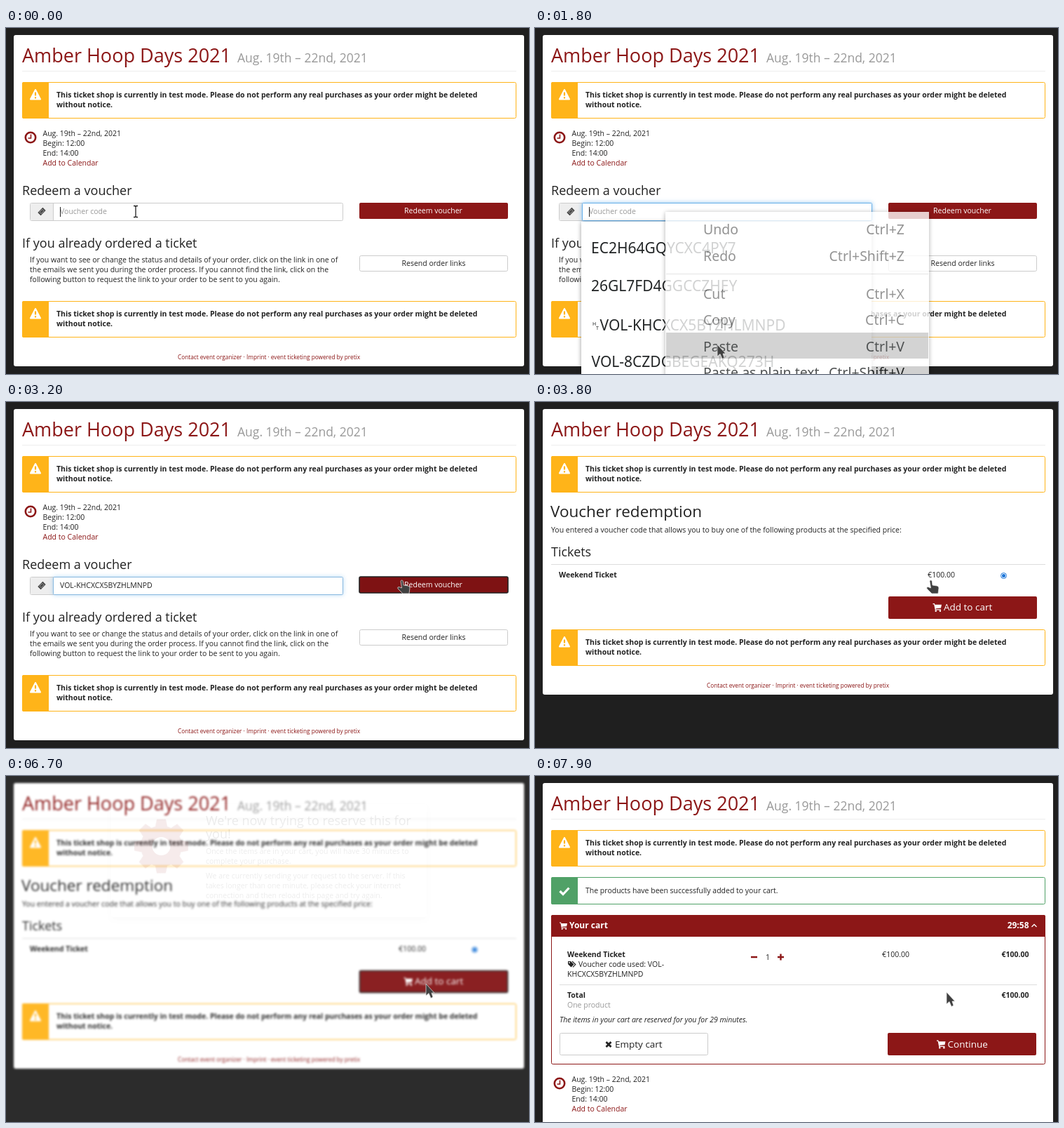
Write an HTML page that moves like this. It is 746 by 493 pixels and loops after 8000 ms.

```html
<!DOCTYPE html>
<html lang="en">
<head>
<meta charset="utf-8">
<title>Ticket shop</title>
<style>
  html, body { margin: 0; width: 100%; height: 100%; overflow: hidden; background: #1f1f1f; }
  svg { display: block; width: 746px; height: 493px; }
  text { font: 10.5px 'Open Sans', sans-serif; fill: #222; white-space: pre; }
  .b { font-weight: 700; }
  .i { font-style: italic; }
  .red { fill: #8c1717; }
  .white { fill: #fff; }
  .grey { fill: #999; }
  .mid { text-anchor: middle; }
  .end { text-anchor: end; }
  .h1 { font-size: 27px; }
  .date { font-size: 17.5px; }
  .h2 { font-size: 22.5px; }
  .h3 { font-size: 18px; }
  .lg { font-size: 13.5px; }
  .head { font-size: 12px; }
  .foot { font-size: 8.25px; }
  .sys { font-family: 'Noto Sans', sans-serif; font-size: 21px; fill: #232627; }
  .menu text { font-family: 'Noto Sans', sans-serif; font-size: 19.5px; fill: #232627; }
  .menu .off { fill: #777; }
  .plain { font: 10px 'Liberation Sans', Arial, sans-serif; fill: #000; }
  .box { fill: #fff; stroke: #ccc; }
  .ring { fill: none; stroke: #222; stroke-width: 1.6; }
  .pop { fill: #fff; filter: drop-shadow(0 1px 3px rgba(0,0,0,.4)); }
  .sheet { fill: #fff; filter: drop-shadow(0 4px 5px rgba(0,0,0,.2)); }
  .glow { fill: #fff; stroke: #66afe9; filter: drop-shadow(0 0 3px rgba(102,175,233,.7)); }

  /* One loop is 8 s, so 1.25% is a tenth of a second. */
  .cut { animation: 8s step-end infinite; }
  .flow { animation: 8s linear infinite; }

  #shop { animation-name: shop; }
  #offer { animation-name: offer; }
  #basket { animation-name: basket; }
  @keyframes shop { 0% { visibility: visible } 46.25%, 100% { visibility: hidden } }
  @keyframes offer { 0% { visibility: hidden } 46.25% { visibility: visible } 91.25%, 100% { visibility: hidden } }
  @keyframes basket { 0% { visibility: hidden } 91.25%, 100% { visibility: visible } }

  #focus { animation-name: focus; }
  #list { animation-name: list; }
  #hint { animation-name: hint; }
  #value { animation-name: value; }
  #preview { animation-name: preview; }
  #pick3 { animation-name: pick3; }
  #pick2 { animation-name: pick2; }
  #row { animation-name: row; }
  @keyframes focus { 0%, .6% { opacity: 0 } 2.5%, 39.4% { opacity: 1 } 41.25%, 100% { opacity: 0 } }
  @keyframes list { 0% { opacity: 0 } 2.5% { opacity: 1 } 40%, 100% { opacity: 0 } }
  @keyframes hint { 0% { opacity: 1 } 23.75%, 100% { opacity: 0 } }
  @keyframes value { 0% { opacity: 0 } 23.75% { opacity: 1 } 26.25% { opacity: 0 } 31.25%, 100% { opacity: 1 } }
  @keyframes preview { 0% { opacity: 0 } 26.25% { opacity: 1 } 31.25%, 100% { opacity: 0 } }
  @keyframes pick3 { 0% { opacity: 1 } 30%, 100% { opacity: 0 } }
  @keyframes pick2 { 0% { opacity: 0 } 30%, 100% { opacity: 1 } }
  @keyframes row {
    0% { opacity: 0; transform: none }
    26.25% { opacity: 1; transform: none }
    30% { opacity: 1; transform: translateY(-54px) }
    31.25%, 100% { opacity: 0; transform: none }
  }

  #menu { animation-name: menu; }
  #paste { animation-name: paste; }
  @keyframes menu {
    0%, 8% { opacity: 0 } 8.75% { opacity: .4 } 10%, 21.25% { opacity: 1 }
    22.5% { opacity: .8 } 25%, 100% { opacity: 0 }
  }
  @keyframes paste { 0% { opacity: 0 } 17.5%, 100% { opacity: 1 } }

  #hover1 { animation-name: hover1; }
  #ring1 { animation-name: ring1; }
  #hover2 { animation-name: hover2; }
  #press { animation-name: press; }
  #ring2 { animation-name: ring2; }
  @keyframes hover1 { 0% { opacity: 0 } 35%, 100% { opacity: 1 } }
  @keyframes ring1 { 0% { opacity: 0 } 40%, 100% { opacity: 1 } }
  @keyframes hover2 { 0% { opacity: 0 } 68.75%, 100% { opacity: 1 } }
  @keyframes press { 0% { opacity: 0 } 80%, 100% { opacity: 1 } }
  @keyframes ring2 { 0% { opacity: 0 } 83.75%, 100% { opacity: 1 } }

  #soft { animation-name: soft; }
  #wait { animation-name: wait; }
  #cog { animation-name: spin; }
  @keyframes soft { 0% { filter: none } 83.75% { filter: blur(1.4px) } 91.25%, 100% { filter: none } }
  @keyframes wait {
    0%, 83.7% { opacity: 0 } 83.75% { opacity: .083 } 85% { opacity: .35 } 86.25% { opacity: .63 }
    87.5% { opacity: .83 } 88.75% { opacity: .95 } 90%, 91.24% { opacity: 1 } 91.25%, 100% { opacity: 0 }
  }
  @keyframes spin { from { transform: rotate(13.5deg) } to { transform: rotate(373.5deg) } }

  #tick1 { animation-name: tick1; }
  #tick2 { animation-name: tick2; }
  @keyframes tick1 { 0% { opacity: 1 } 96.25%, 100% { opacity: 0 } }
  @keyframes tick2 { 0% { opacity: 0 } 96.25%, 100% { opacity: 1 } }

  #pointer { animation-name: move; }
  #beam { animation-name: beam; }
  #arrow { animation-name: arrow; }
  #hand { animation-name: hand; }
  @keyframes beam { 0% { opacity: 1 } 8.75%, 100% { opacity: 0 } }
  @keyframes arrow {
    0% { opacity: 0 } 8.75% { opacity: 1 } 35% { opacity: 0 }
    57.5% { opacity: 1 } 68.75% { opacity: 0 } 83.75%, 100% { opacity: 1 }
  }
  @keyframes hand {
    0% { opacity: 0 } 35% { opacity: 1 } 57.5% { opacity: 0 }
    68.75% { opacity: 1 } 83.75%, 100% { opacity: 0 }
  }
  @keyframes move {
    0%, 8.75% { transform: translate(185px, 261px) }
    13.75% { transform: translate(222px, 350px) }
    18.75% { transform: translate(259px, 448px) }
    22.5% { transform: translate(260px, 451px) }
    26.25% { transform: translate(272px, 444px) }
    28.75% { transform: translate(286px, 430px) }
    30% { transform: translate(410px, 372px) }
    31.25%, 33.75% { transform: translate(501px, 318px) }
    35% { transform: translate(540px, 281px) }
    36.25%, 56.25% { transform: translate(565px, 254px) }
    60% { transform: translate(540px, 264px) }
    62.5% { transform: translate(533px, 266px) }
    63.75%, 65% { transform: translate(556px, 245px) }
    68.75% { transform: translate(588px, 284px) }
    70%, 83.75% { transform: translate(599px, 296px) }
    90%, 95% { transform: translate(597px, 297px) }
    98.75%, 100% { transform: translate(587px, 308px) }
  }
</style>
</head>
<body>
<svg viewBox="0 0 746 493">
  <defs>
    <g id="top">
      <text class="h1 red" x="23" y="49">Amber Hoop Days 2021</text>
      <text class="date grey" x="330" y="49">Aug. 19th – 22nd, 2021</text>
      <path d="M23 61.5H728" stroke="#eee"/>
    </g>
    <g id="alert">
      <rect x="23.5" y="77.5" width="704" height="51" rx="2" fill="#fff" stroke="#ffb419"/>
      <path d="M25 77H61V129H25a2 2 0 0 1-2-2V79a2 2 0 0 1 2-2z" fill="#ffb419"/>
      <path d="M42 88L49 101.500H35z" fill="#fff" stroke="#fff" stroke-width="2" stroke-linejoin="round"/>
      <path d="M42 91.500V96.500M42 98.200V100.400" stroke="#ffb419" stroke-width="2.200"/>
      <text class="b" x="72" y="99">This ticket shop is currently in test mode. Please do not perform any real purchases as your order might be deleted</text>
      <text class="b" x="72" y="113">without notice.</text>
    </g>
    <g id="when">
      <circle cx="35" cy="156" r="7.200" fill="none" stroke="#8c1717" stroke-width="2.600"/>
      <path d="M35.500 151.500V157H31.500" fill="none" stroke="#8c1717" stroke-width="1.600"/>
      <text x="52.500" y="154">Aug. 19th – 22nd, 2021</text>
      <text x="52.500" y="168">Begin: 12:00</text>
      <text x="52.500" y="182">End: 14:00</text>
      <text class="red" x="52.500" y="196">Add to Calendar</text>
    </g>
    <text id="footer" class="foot red mid" x="375" y="472">Contact event organizer · Imprint · event ticketing powered by pretix</text>
    <g id="trolley" fill="#fff">
      <path d="M0 .5H2.400L2.900 2.200H12.500L11.500 7 4.200 7.800 4.400 8.700H11.500V9.900H3.300L1.600 1.700H0z"/>
      <circle cx="4.200" cy="11.300" r="1.200"/><circle cx="10.400" cy="11.300" r="1.200"/>
    </g>
    <path id="tooth" d="M-6.500-38.500H6.500L9-26H-9z"/>
  </defs>

  <rect width="746" height="493" fill="#1f1f1f"/>

  <g id="shop" class="cut">
    <rect x="11" y="10" width="728" height="472" rx="3" fill="#fff"/>
    <use href="#top"/><use href="#alert"/><use href="#when"/>
    <use href="#alert" y="312"/><use href="#footer"/>

    <text class="h3" x="23" y="238">Redeem a voucher</text>
    <rect class="box" x="34.500" y="249.500" width="446" height="25" rx="2"/>
    <path d="M35 250H67V274H35z" fill="#eee"/>
    <path d="M67.500 250V274" stroke="#ccc"/>
    <g transform="translate(51 261.500) rotate(-45)">
      <rect x="-5" y="-3" width="10" height="6" fill="#444"/>
      <rect x="-2.800" y="-1.600" width="5.600" height="3.200" fill="none" stroke="#ccc" stroke-width=".7"/>
    </g>
    <rect id="focus" class="glow flow" x="67.500" y="249.500" width="413" height="25" rx="1"/>
    <g id="hint" class="cut">
      <text class="grey" x="77" y="265">Voucher code</text>
      <path d="M77.500 255V269" stroke="#222"/>
    </g>
    <text id="value" class="cut" x="77" y="265">VOL-KHCXCX5BYZHLMNPD</text>
    <g id="preview" class="cut">
      <rect x="68" y="250" width="412" height="24" fill="#e8f0fe"/>
      <g id="pick3" class="cut"><text class="plain" x="77" y="265">VOL-KHCXCX5BYZHLMNPD</text></g>
      <g id="pick2" class="cut"><text class="plain" x="77" y="265">26GL7FD4GGCCZHEY</text></g>
    </g>

    <rect x="504" y="249" width="212" height="23" rx="2" fill="#8c1717"/>
    <rect id="hover1" class="cut" x="504" y="249" width="212" height="23" rx="2" fill="#7e1213"/>
    <rect id="ring1" class="ring cut" x="504" y="249" width="212" height="23" rx="2"/>
    <text class="white mid" x="609.500" y="264">Redeem voucher</text>

    <text class="h3" x="23" y="313">If you already ordered a ticket</text>
    <text x="34" y="334">If you want to see or change the status and details of your order, click on the link in one of</text>
    <text x="34" y="348">the emails we sent you during the order process. If you cannot find the link, click on the</text>
    <text x="34" y="362">following button to request the link to your order to be sent to you again.</text>
    <rect class="box" x="504.500" y="324.500" width="211" height="22" rx="2"/>
    <text class="mid" x="610" y="339">Resend order links</text>

    <g id="list" class="cut">
      <rect class="pop" x="66" y="276" width="414" height="240"/>
      <rect id="row" class="cut" x="66" y="396" width="414" height="54" fill="#c8c8c8"/>
      <text class="sys" x="80" y="321">EC2H64GQYCXC4PY7</text>
      <text class="sys" x="80" y="375">26GL7FD4GGCCZHEY</text>
      <text class="sys" x="82" y="424" style="font-size:7px">H</text>
      <text class="sys" x="87" y="430" style="font-size:7px">T</text>
      <text class="sys" x="92.500" y="431">VOL-KHCXCX5BYZHLMNPD</text>
      <text class="sys" x="80.500" y="483">VOL-8CZDGBEGEAKQ273H</text>
    </g>

    <g id="menu" class="menu flow">
      <rect class="pop" x="186" y="262" width="376" height="250"/>
      <rect id="paste" class="cut" x="187" y="434" width="374" height="37" fill="#c8c8c8"/>
      <path d="M187 350.500H561" stroke="#ddd"/>
      <text class="off" x="240" y="294">Undo</text><text class="off end" x="527" y="294">Ctrl+Z</text>
      <text class="off" x="240" y="332">Redo</text><text class="off end" x="527" y="332">Ctrl+Shift+Z</text>
      <text class="off" x="240" y="386">Cut</text><text class="off end" x="527" y="386">Ctrl+X</text>
      <text class="off" x="240" y="423">Copy</text><text class="off end" x="527" y="423">Ctrl+C</text>
      <text x="240" y="461">Paste</text><text class="end" x="527" y="461">Ctrl+V</text>
      <text x="240" y="498">Paste as plain text</text><text class="end" x="527" y="498">Ctrl+Shift+V</text>
    </g>
  </g>

  <g id="offer" class="cut">
    <g id="soft" class="cut">
      <rect x="11" y="10" width="728" height="407" rx="3" fill="#fff"/>
      <use href="#top"/><use href="#alert"/>
      <text class="h2" x="22" y="164">Voucher redemption</text>
      <text x="23" y="186">You entered a voucher code that allows you to buy one of the following products at the specified price:</text>
      <text class="h3" x="23" y="220">Tickets</text>
      <path d="M23 231.500H728" stroke="#ddd"/>
      <text class="b" x="34" y="250">Weekend Ticket</text>
      <text x="560" y="250">€100.00</text>
      <circle cx="668.500" cy="247.500" r="4" fill="#fff" stroke="#1a74d8"/>
      <circle cx="668.500" cy="247.500" r="2.500" fill="#1a74d8"/>
      <rect x="504" y="277" width="212" height="32" rx="2" fill="#8c1717"/>
      <rect id="hover2" class="cut" x="504" y="277" width="212" height="32" rx="2" fill="#831315"/>
      <path id="press" class="cut" d="M505 308.300H715" stroke="#4a0b0c" stroke-width="1.500"/>
      <rect id="ring2" class="ring cut" x="504.500" y="277.500" width="211" height="31" rx="2"/>
      <use href="#trolley" x="567.500" y="286.500"/>
      <text class="lg white" x="583" y="297">Add to cart</text>
      <use href="#alert" y="247"/><use href="#footer" y="-65"/>
    </g>
    <g id="wait" class="flow">
      <rect width="746" height="493" fill="#fff" opacity=".7"/>
      <rect class="sheet" x="150" y="40" width="450" height="161" rx="3"/>
      <g transform="translate(221.500 100)">
        <g id="cog" class="flow" fill="#8c1717">
          <circle r="29.500"/>
          <use href="#tooth"/><use href="#tooth" transform="rotate(45)"/>
          <use href="#tooth" transform="rotate(90)"/><use href="#tooth" transform="rotate(135)"/>
          <use href="#tooth" transform="rotate(180)"/><use href="#tooth" transform="rotate(225)"/>
          <use href="#tooth" transform="rotate(270)"/><use href="#tooth" transform="rotate(315)"/>
        </g>
        <circle r="13" fill="#fff"/>
      </g>
      <text class="h3" x="285" y="70">We're now trying to reserve this for</text>
      <text class="h3" x="285" y="89">you!</text>
      <text x="285" y="111">Once the items are in your cart, you will have 30 minutes to</text>
      <text x="285" y="125">complete your purchase.</text>
      <text x="285" y="146">We are currently sending your request to the server. If this</text>
      <text x="285" y="160">takes longer than one minute, please check your internet</text>
      <text x="285" y="174">connection and then reload this page and try again.</text>
    </g>
  </g>

  <g id="basket" class="cut">
    <rect x="11" y="10" width="728" height="500" rx="3" fill="#fff"/>
    <use href="#top"/><use href="#alert"/><use href="#when" y="282"/>

    <rect x="23.500" y="144.500" width="704" height="38" rx="2" fill="#fff" stroke="#50a167"/>
    <path d="M25 144H61V183H25a2 2 0 0 1-2-2V146a2 2 0 0 1 2-2z" fill="#50a167"/>
    <path d="M35.500 164L40 168.500 48.500 159.500" fill="none" stroke="#fff" stroke-width="3.200"/>
    <text x="72" y="167">The products have been successfully added to your cart.</text>

    <rect x="23.500" y="198.500" width="704" height="212" rx="2" fill="#fff" stroke="#8c1717"/>
    <path d="M25 198H726a2 2 0 0 1 2 2V229H23V200a2 2 0 0 1 2-2z" fill="#8c1717"/>
    <use href="#trolley" transform="translate(35 208) scale(.88)"/>
    <text class="head b white" x="49" y="217">Your cart</text>
    <g id="tick1" class="cut"><text class="head b white end" x="704.500" y="217">29:59</text></g>
    <g id="tick2" class="cut"><text class="head b white end" x="704.500" y="217">29:58</text></g>
    <path d="M708.500 215L712 211.500 715.500 215" fill="none" stroke="#fff" stroke-width="1.300"/>

    <text class="b" x="46" y="258">Weekend Ticket</text>
    <path d="M47 264H51L55.500 268.500 51.500 272.500 47 268z" fill="#222"/>
    <path d="M53 264L57.700 268.600 54 272.400" fill="none" stroke="#222" stroke-width="1.200"/>
    <circle cx="49" cy="266" r=".9" fill="#fff"/>
    <text x="62" y="272">Voucher code used: VOL-</text>
    <text x="46" y="286">KHCXCX5BYZHLMNPD</text>
    <path d="M308 258H317M346 258H355M350.500 253.500V262.500" stroke="#8c1717" stroke-width="2.400"/>
    <text class="mid" x="332" y="262">1</text>
    <text x="495" y="258">€100.00</text>
    <text class="b end" x="704.500" y="258">€100.00</text>
    <path d="M35 297.500H716" stroke="#ddd"/>
    <text class="b" x="46" y="316">Total</text>
    <text class="b end" x="704.500" y="316">€100.00</text>
    <text class="grey" x="46" y="330">One product</text>
    <text class="i" x="35" y="351">The items in your cart are reserved for you for 29 minutes.</text>

    <rect class="box" x="35.500" y="366.500" width="211" height="31" rx="2"/>
    <path d="M101.500 379L108.500 386M108.500 379L101.500 386" stroke="#222" stroke-width="2.800"/>
    <text class="lg" x="114" y="387">Empty cart</text>
    <rect x="503" y="366" width="212" height="32" rx="2" fill="#8c1717"/>
    <use href="#trolley" x="573" y="376"/>
    <text class="lg white" x="588.500" y="387">Continue</text>
  </g>

  <g id="pointer" class="flow">
    <path id="beam" class="cut" d="M-3-7.500H-1L0-6.500 1-7.500H3M0-6.500V7.500M-3 8.500H-1L0 7.500 1 8.500H3" fill="none" stroke="#222" stroke-width="1.300"/>
    <path id="arrow" class="cut" d="M0 0V17L4 13.500 7 20.500 10 19 8 13H12z" fill="#404040" stroke="#eee" stroke-width=".7"/>
    <path id="hand" class="cut" d="M-2 1.500C-2-.5 1-.5 1.300 1.500L2 7 8.500 8Q11 8.500 11 11L10 19H1L-6 12Q-7 9.500-4.500 9.500L-.5 11z" fill="#404040" stroke="#eee" stroke-width=".7"/>
  </g>
</svg>
</body>
</html>
```
